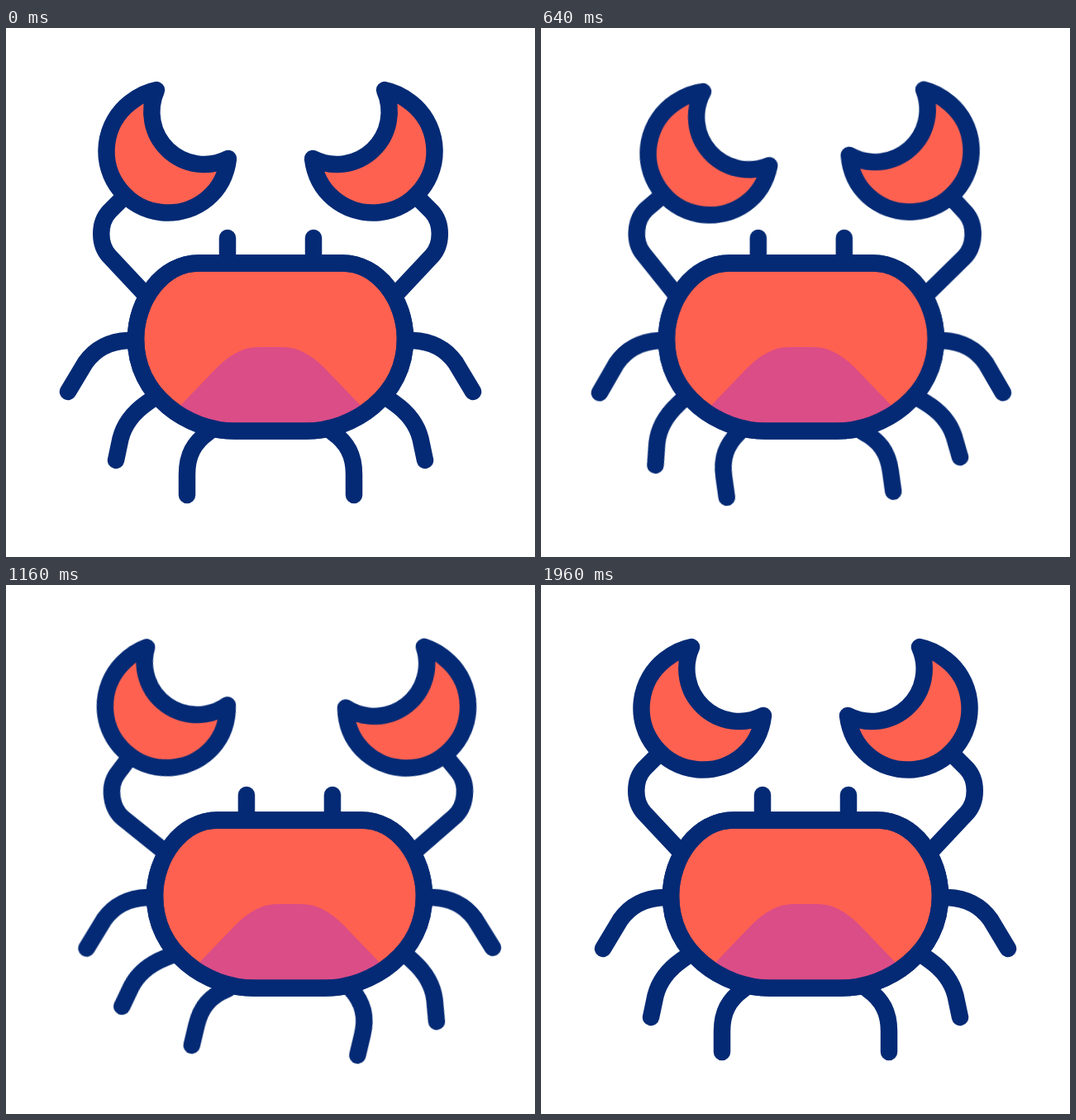
Recreate the animation shown at these times as an HTML page without scripts. Size 640 by 640 pixels, loop 2 s.

```html
<!DOCTYPE html>
<html lang="en">
<head>
<meta charset="utf-8">
<title>Crab</title>
<style>
  html, body { margin: 0; width: 100%; height: 100%; overflow: hidden; background: #fff; }
  svg { display: block; width: 100%; height: 100%; }

  .line { fill: none; stroke: #042a75; stroke-width: 20.5; stroke-linecap: round; stroke-linejoin: round; }
  .shell { fill: #ff6150; }
  .shade { fill: #db4d87; stroke: none; }
  .rim { fill-opacity: 0; }

  .left { --s: -1; }
  .right { --s: 1; transform: translate(640px, 0) scale(-1, 1); }

  .crab, .leg, .arm, .claw {
    animation: 2s cubic-bezier(.364, 0, .636, 1) infinite;
  }
  .crab { animation-name: sway; }
  .top { transform-origin: 157px 378px; }
  .mid { transform-origin: 181px 450px; }
  .low { transform-origin: 245px 488px; }
  .arm { transform-origin: 167px 322px; }

  .mid, .low { animation-name: leg-late; }
  .left .top { animation-name: leg-top-left; }
  .right .top { animation-name: leg-top-right; }
  .right .mid { animation-name: leg-mid-right; }
  .left .arm { animation-name: arm-left; }
  .right .arm { animation-name: arm-right; }
  .claw { animation-name: snap; }
  .right .claw { animation-delay: -47ms; }

  @keyframes sway {
    0%, 91.75%, 100% { transform: translateX(0); }
    17.75% { transform: translateX(44.5px); }
    41.9% { transform: translateX(-32.8px); }
    66% { transform: translateX(41px); }
  }
  @keyframes leg-top-right {
    0%, 90.5%, 100% { transform: rotate(0deg); }
    20.75% { transform: rotate(calc(var(--s) * 20.5deg)); }
    44.25% { transform: rotate(calc(var(--s) * -25deg)); }
    67.25% { transform: rotate(calc(var(--s) * 14.5deg)); }
  }
  @keyframes leg-top-left {
    0%, 93%, 100% { transform: rotate(0deg); }
    21.25% { transform: rotate(calc(var(--s) * 20.5deg)); }
    45% { transform: rotate(calc(var(--s) * -25deg)); }
    67.5% { transform: rotate(calc(var(--s) * 14.5deg)); }
  }
  @keyframes leg-mid-right {
    0%, 94%, 100% { transform: rotate(0deg); }
    22% { transform: rotate(calc(var(--s) * 22deg)); }
    46.25% { transform: rotate(calc(var(--s) * -26.5deg)); }
    71% { transform: rotate(calc(var(--s) * 16deg)); }
  }
  @keyframes leg-late {
    0%, 98%, 100% { transform: rotate(0deg); }
    22.75% { transform: rotate(calc(var(--s) * 22deg)); }
    48.5% { transform: rotate(calc(var(--s) * -26.5deg)); }
    74% { transform: rotate(calc(var(--s) * 16deg)); }
  }
  @keyframes arm-left {
    0%, 98%, 100% { transform: rotate(0deg); }
    23.25% { transform: rotate(14deg); }
    47.75% { transform: rotate(-19.4deg); }
    74.5% { transform: rotate(15.7deg); }
  }
  @keyframes arm-right {
    0%, 95%, 100% { transform: rotate(0deg); }
    21.75% { transform: rotate(14.3deg); }
    45% { transform: rotate(-26.3deg); }
    71% { transform: rotate(14.5deg); }
  }
  /* open, half shut, shut: the half pose bends the path of the lower tip */
  @keyframes snap {
    0%, 13.5%, 31%, 39.5%, 57.25%, 100% {
      d: path("M182 75C170.3 77.2 159.5 83 150.1 90.3A74.5 74.5 0 0 0 138.1 195.9A74.5 74.5 0 0 0 243.9 206.1C258.4 193.9 266.7 176.8 269 158C244.9 170.3 215.5 166 195.9 147.3C176.3 128.6 171 99.7 182 75Z");
      animation-timing-function: cubic-bezier(.12, 0, .39, 0);
    }
    18.4%, 27.1%, 44.6%, 53.5% {
      d: path("M192.8 94.5C180.2 84.1 160.3 82.5 150.1 90.3A74.5 74.5 0 0 0 138.1 195.9A74.5 74.5 0 0 0 243.9 206.1C259.2 193.2 262 171 253 140C232 152 204.3 158.5 192.2 150.2C182.2 138.8 184.5 113.4 192.8 94.5Z");
      animation-timing-function: cubic-bezier(.61, 1, .88, 1);
    }
    23.25%, 49.75% {
      d: path("M203.5 114C190 91 161 82 150.1 90.3A74.5 74.5 0 0 0 138.1 195.9A74.5 74.5 0 0 0 243.9 206.1C260 192.5 253 170 229 135.5C214 142 193 151 188.5 153C188 149 198 127 203.5 114Z");
      animation-timing-function: cubic-bezier(.12, 0, .39, 0);
    }
  }
</style>
</head>
<body>
<svg viewBox="0 0 640 640">
  <defs>
    <path id="leg-top" d="M157 378H148C125 379 108 388 96 405L75 440"/>
    <path id="leg-mid" d="M181 446L170 454C153 466 143 479 138.5 497L133 523"/>
    <path id="leg-low" d="M245 489C227 502 219 517 219 540V565"/>
    <path id="upper-arm" d="M170 324L125 276C112 262 112 236 125 222L142 205"/>
    <path id="eye" d="M268 254V284"/>
  </defs>

  <g class="crab line">
    <g class="left">
      <use class="leg top" href="#leg-top"/>
      <use class="leg mid" href="#leg-mid"/>
      <use class="leg low" href="#leg-low"/>
      <g class="arm">
        <use href="#upper-arm"/>
        <path class="claw shell"/>
      </g>
      <use href="#eye"/>
    </g>
    <g class="right">
      <use class="leg top" href="#leg-top"/>
      <use class="leg mid" href="#leg-mid"/>
      <use class="leg low" href="#leg-low"/>
      <g class="arm">
        <use href="#upper-arm"/>
        <path class="claw shell"/>
      </g>
      <use href="#eye"/>
    </g>

    <path id="body" class="shell" d="M233 284.5H407C451 284.5 483 330 483 376C483 445 420 487.5 363 487.5H277C220 487.5 157 445 157 376C157 330 189 284.5 233 284.5Z"/>
    <path class="shade" d="M205 463L255 411Q280 386 305 386H335Q360 386 385 411L435 463Q400 487 363 487.5H277Q240 487 205 463Z"/>
    <use class="rim" href="#body"/>
  </g>
</svg>
</body>
</html>
```
